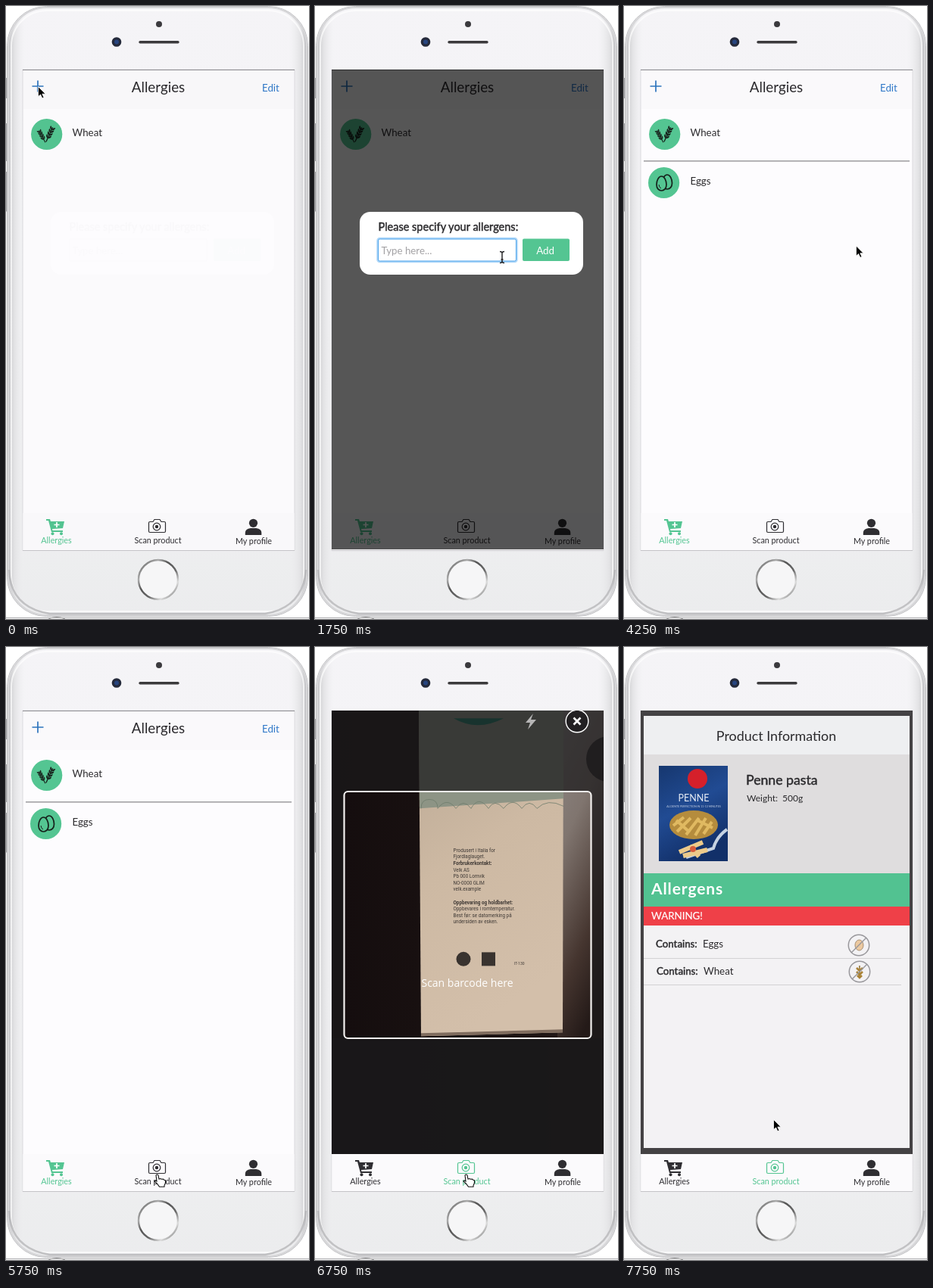
Animation, 400 px wide and 810 px high, one loop 8000 ms. Source, as an HTML page:

```html
<!DOCTYPE html>
<html lang="en">
<head>
<meta charset="utf-8">
<title>Allergy app</title>
<style>
  html, body { margin: 0; width: 100%; height: 100%; overflow: hidden; background: #fff; }
  svg { display: block; width: 400px; height: 810px; font: 13.3px Lato, sans-serif; fill: #2b2a2d; }
  .mid { text-anchor: middle; }
  .heavy { stroke: currentColor; stroke-width: .45; color: #2b2a2d; }
  .line { fill: none; stroke: #1d1d1f; }
  .tab { font-size: 10.8px; text-anchor: middle; color: #2f2e32; fill: currentColor; }
  .on { color: #54c592; }
  .print { font: 6.3px Roboto, sans-serif; fill: #3f3935; }
  .print .b { font-weight: bold; }
</style>
</head>
<body>
<svg viewBox="0 0 400 810">
  <defs>
    <linearGradient id="body" x2="0" y2="1">
      <stop stop-color="#f5f4f7"/><stop offset=".5" stop-color="#f3f3f5"/><stop offset="1" stop-color="#e8e9ea"/>
    </linearGradient>
    <linearGradient id="sides">
      <stop stop-color="#c4c4c7"/><stop offset=".02" stop-color="#e2e2e4"/><stop offset=".055" stop-color="#f4f4f6" stop-opacity=".3"/>
      <stop offset=".94" stop-color="#f4f4f6" stop-opacity=".3"/><stop offset=".98" stop-color="#e2e2e4"/><stop offset="1" stop-color="#bfbfc2"/>
    </linearGradient>
    <linearGradient id="ring" x2="1" y2="1">
      <stop stop-color="#555"/><stop offset=".25" stop-color="#aaa"/><stop offset=".4" stop-color="#555"/>
      <stop offset=".6" stop-color="#666"/><stop offset=".78" stop-color="#ddd"/><stop offset="1" stop-color="#555"/>
    </linearGradient>
    <linearGradient id="table">
      <stop stop-color="#140d0e"/><stop offset=".75" stop-color="#1d1413"/><stop offset="1" stop-color="#2a1f1e"/>
    </linearGradient>
    <linearGradient id="shine" x1=".2" x2=".5" y2="1">
      <stop stop-color="#8d8785"/><stop offset=".35" stop-color="#80756f"/><stop offset=".75" stop-color="#45352f"/><stop offset="1" stop-color="#241a18"/>
    </linearGradient>
    <linearGradient id="carton" x2=".3" y2="1">
      <stop stop-color="#b9a793"/><stop offset=".5" stop-color="#cdb9a3"/><stop offset="1" stop-color="#d3bfaa"/>
    </linearGradient>
    <linearGradient id="pack" x2=".4" y2="1">
      <stop stop-color="#16376f"/><stop offset=".5" stop-color="#214b93"/><stop offset="1" stop-color="#123069"/>
    </linearGradient>
    <clipPath id="screen"><path d="M22 84h359v586H22z"/></clipPath>
    <g id="ear">
      <path d="M0 11V-10" stroke="#17201b" stroke-width="1.3"/>
      <path id="grains" fill="#17201b"/>
    </g>
  </defs>

  <!-- Phone -->
  <path d="M0 95h3v27H0zM0 155h3v50H0zM0 220h3v50H0z" fill="#d4d4d6"/>
  <path d="M.5 95v27M.5 155v50M.5 219v52M0 271h3" class="line" style="stroke:#a5a5a8"/>
  <path d="M0 808.5h400" stroke="#a9a9ac"/>
  <rect x="1.5" y=".5" width="397" height="806" rx="52" fill="url(#body)" stroke="#bebec1"/>
  <rect x="3" y="2" width="394" height="803" rx="51" fill="url(#sides)" stroke="#d6d6d8" stroke-width="2"/>
  <rect x="7" y="6" width="386" height="794" rx="47" fill="none" stroke="#fff" stroke-width="2" opacity=".7"/>
  <path d="M4 745q2 50 54 58h284q50-8 54-58" fill="none" stroke="#b4b4b7" stroke-width="2.5" opacity=".8"/>
  <path d="M56 810q11-5 22 0" class="line" style="stroke:#999"/>
  <circle cx="202" cy="24" r="4" fill="#3b3a3e"/>
  <circle cx="146" cy="47.5" r="6.3" fill="#252a3b"/>
  <circle cx="146" cy="47.5" r="3" fill="#28457f"/>
  <path d="M177 47.7h50" stroke="#3b3a3c" stroke-width="3.4" stroke-linecap="round"/>
  <circle cx="201" cy="758" r="26" fill="#f6f6f7" stroke="url(#ring)" stroke-width="2.4"/>
  <path d="M22 84h359v635.5H22z" fill="#fdfcfe" stroke="#d9d8dc"/>
  <path d="M22 84.5h359" stroke="#8f8e92"/>
  <path d="M22 719.5h359" stroke="#c4c3c7"/>

  <!-- Allergy list -->
  <g id="list">
    <path d="M23 85h357v51H23z" fill="#faf9fb"/>
    <path d="M34.5 106h15M42 98.500v15" stroke="#2c74bd" stroke-width="1.7"/>
    <text class="mid" x="201" y="113.500" font-size="18.8">Allergies</text>
    <text x="338" y="112.500" fill="#2f78c8">Edit</text>
    <circle cx="53.700" cy="169.500" r="20.600" fill="#54c592"/>
    <use href="#ear" transform="translate(47.500 172) rotate(-28) scale(.85)"/>
    <use href="#ear" transform="translate(57.500 169.500) rotate(25)"/>
    <text x="87.500" y="172">Wheat</text>
    <g id="eggs">
      <path d="M26 204.800h351" stroke="#89888b" stroke-width="1.2"/>
      <circle cx="52.600" cy="233.500" r="20.600" fill="#54c592"/>
      <g fill="#54c592" stroke="#16211b" stroke-width="1.7">
        <path id="egg" d="M57 223c4 0 6.500 6 6.500 11s-3 8-6.500 8-6.500-3-6.500-8 2.500-11 6.500-11z"/>
        <use href="#egg" x="-7.500" y="2"/>
      </g>
      <path d="M46 236q.5 4 3 5" class="line"/>
      <text x="87.500" y="236">Eggs</text>
    </g>
  </g>

  <path id="dark" d="M22 84h359v586H22z" fill="#444244"/>

  <!-- Scanner -->
  <g id="scanner" clip-path="url(#screen)">
    <path d="M22 84h359v586H22z" fill="url(#table)"/>
    <path d="M320 84h61v433h-61z" fill="url(#shine)"/>
    <g id="parcel">
      <path d="M137 70h191l-1 429-187 5z" fill="url(#carton)"/>
      <path d="M137 70h191v120l-190 13z" fill="#8d9485"/>
      <path d="M140 203q0-12 11-12t11 12q12-16 24 0 10-14 20 0 10-18 23 0 8-14 20 0 12-16 24 0 10-14 20 0 14-14 35-3" fill="none" stroke="#6f7d6d" stroke-width=".8"/>
      <path d="M183 84q31 18 66 0z" fill="#147b63"/>
      <path d="M140 500l187-5v4l-187 5z" fill="#7f6c5e"/>
      <g id="print" class="print"></g>
      <circle cx="196" cy="402" r="9.500" fill="#39332f"/>
      <path d="M220 393h18v18h-18z" fill="#39332f"/>
      <text x="263" y="410" class="print" style="font-size:5px">IT-130</text>
    </g>
    <path d="M22 84h359v586H22zM43 191h317q4 0 4 4v317q0 4-4 4H43q-4 0-4-4V195q0-4 4-4z" fill="#1b191b" fill-opacity=".73" fill-rule="evenodd"/>
    <path d="M22 517h359v153H22z" fill="#1a1819" opacity=".8"/>
    <circle cx="388" cy="148" r="30" fill="#171617" opacity=".7"/>
    <rect x="38.500" y="191" width="326" height="326" rx="5" fill="none" stroke="#f3f1ef" stroke-width="2.200"/>
    <text class="mid" x="201" y="449" fill="#fff" style="font:14px 'Open Sans',sans-serif">Scan barcode here</text>
    <path d="M288 88l-10 12h6l-3 9 11-13h-7z" fill="#b6b5b5"/>
    <circle cx="346" cy="98" r="14.800" fill="#222022" stroke="#fff" stroke-width="1.400"/>
    <path d="M341.500 93.500l9 9m0-9l-9 9" stroke="#fff" stroke-width="2.600"/>
  </g>

  <!-- Product page -->
  <g id="product">
    <path d="M26 91h351v571H26z" fill="#f3f2f4"/>
    <path d="M26 91h351v51H26z" fill="#eeeff1"/>
    <path d="M26 142h351v157H26z" fill="#dfddde"/>
    <path d="M26 299h351v44H26z" fill="#52c291"/>
    <path d="M26 343h351v25H26z" fill="#ef4048"/>
    <text class="mid" x="201" y="123.500" font-size="17.900">Product Information</text>
    <path d="M46 157h91v126H46z" fill="url(#pack)"/>
    <circle cx="97" cy="174" r="13" fill="#d5202b"/>
    <text class="mid" x="92" y="204" fill="#e8edf5" font-size="12.500">PENNE</text>
    <text class="mid" x="92" y="212" fill="#c5d0e4" font-size="3.600">AL DENTE PERFECTION IN 11-13 MINUTES</text>
    <ellipse cx="92" cy="235" rx="32" ry="19" fill="#b58c3d"/>
    <path d="M65 236l14-11M70 244l18-18M82 248l17-22M94 249l14-23M105 247l11-16M69 229l18 16M97 229l20 10" stroke="#e0b961" stroke-width="4"/>
    <path d="M136 241q-14 10-18 25l-36 12" fill="none" stroke="#c5d2e2" stroke-width="4"/>
    <path d="M73 271l31-13M78 276l32-8M86 263l13 14" stroke="#edca8a" stroke-width="6"/>
    <circle cx="91" cy="267" r="4" fill="#d75b3d"/>
    <text class="heavy" x="161" y="182" font-size="17.700">Penne pasta</text>
    <text x="162" y="204" font-size="12">Weight:</text><text x="209" y="204" font-size="12">500g</text>
    <text x="36" y="327" fill="#fff" font-size="21" font-weight="bold" letter-spacing=".9">Allergens</text>
    <text x="36" y="360" fill="#fff" class="heavy" style="color:#fff;stroke-width:.2">WARNING!</text>
    <text class="heavy" x="42" y="397">Contains:</text><text x="104" y="397">Eggs</text>
    <text class="heavy" x="43" y="432.500">Contains:</text><text x="105" y="432.500">Wheat</text>
    <path d="M26 411.500h340M26 446.500h340" stroke="#d3d2d4"/>
    <ellipse cx="310.500" cy="394" rx="5.500" ry="7" fill="#ecc9a0" stroke="#a58d72"/>
    <path d="M311 438v-17" stroke="#8c6d2f" stroke-width="1.500"/>
    <path d="M307 424l4 4 4-4M307 429l4 4 4-4M308 434l3 3 3-3" fill="none" stroke="#a98235" stroke-width="2.600"/>
    <g fill="none" stroke="#98979b" stroke-width="1.500">
      <circle cx="310" cy="394" r="13.700"/><path d="M300 404l20-20"/>
      <circle cx="311" cy="429" r="13.700"/><path d="M301 439l20-20"/>
    </g>
  </g>

  <!-- Tab bar -->
  <path d="M22.500 670h358v49h-358z" fill="#fbfafc"/>
  <g class="tab" id="tabList">
    <path d="M53 678h5l1 3h18l-2 9-14 1 .5 2H75v2H60l-4-15h-3z"/>
    <circle cx="61.500" cy="697.300" r="2"/><circle cx="73" cy="697.300" r="2"/>
    <path d="M67 682v7M63.500 685.500h7" stroke="#fff" stroke-width="1.700"/>
    <text x="66.500" y="710">Allergies</text>
  </g>
  <g class="tab" id="tabScan">
    <g fill="none" stroke="currentColor" stroke-width="1.200">
      <path d="M190 681.500h4l2-3h7l2 3h4q1.500 0 1.500 1.500v11q0 1.500-1.500 1.500h-19q-1.500 0-1.500-1.500v-11q0-1.500 1.500-1.500z"/>
      <circle cx="199" cy="688" r="4.800"/>
    </g>
    <circle cx="199" cy="688" r="2.200"/>
    <text x="200.500" y="709.500">Scan product</text>
  </g>
  <g class="tab">
    <circle cx="326.500" cy="683.300" r="5.600"/>
    <path d="M315.800 699v-3q0-5 7-6h7.500q7 1 7 6v3z"/>
    <text x="327" y="710.500">My profile</text>
  </g>

  <!-- Dialog -->
  <g id="dialog">
    <path d="M22 84h359v634H22z" opacity=".66" fill="#000"/>
    <rect x="59" y="272" width="295" height="83" rx="14" fill="#fff"/>
    <text class="heavy" x="83.500" y="297" font-size="14.500">Please specify your allergens:</text>
    <rect id="glow" x="82.500" y="307" width="184" height="31" rx="3" fill="none" stroke="#9bcdf7" stroke-width="2.500" opacity=".8"/>
    <rect id="field" x="83.500" y="308" width="182" height="29" rx="2" fill="#fff"/>
    <text id="entry" x="87.500" y="327.500"></text>
    <path id="caret" d="M88.500 315v15" stroke="#222"/>
    <rect id="add" x="274" y="307.500" width="62" height="29.500" rx="2"/>
    <text class="mid" x="304" y="327.500" fill="#fff">Add</text>
  </g>

  <!-- Pointers, each with its hot spot at 0,0 -->
  <g id="pointer">
    <path id="arrow" d="M0 0v13.200l3.100-2.700 2.200 4.800 2.200-.9-2.200-4.700h4.300z" fill="#000" stroke="#fff" stroke-width=".8"/>
    <path id="beam" d="M-3-7.500q3 0 3 2 0-2 3-2M0-5.500v11M-3 7.500q3 0 3-2 0 2 3 2M-1.500 3h3" class="line" stroke-width="1.400"/>
    <path id="hand" d="M-1 1q1.500-2 3 0l1 5 2-.5 1.500.8 2-.3 1.300 1.200 1.500.3q1 4-1.300 7v1.800H3.500Q1 12-3 9q0-2 3 0z" fill="#fff" stroke="#111" stroke-width="1.100"/>
  </g>
</svg>

<script>
const LOOP = 8000, STEP = 250;
const $ = id => document.getElementById(id);
const show = (id, on) => $(id).style.display = on ? "" : "none";
const ramp = (t, from, to) => Math.min(1, Math.max(0, (t - from) / (to - from)));
const ease = p => p * p * (3 - 2 * p);

// Pointer stops: time, x, y
const route = [
  [0, 42.5, 106.5], [750, 42.5, 106.5], [1500, 247, 332], [3250, 247, 332], [3750, 306.5, 317],
  [4500, 306.5, 317], [5500, 199, 697], [7500, 199, 697], [7750, 197.5, 624.5], [LOOP, 197.5, 624.5]
];

let grains = "";
for (let y = -9; y < 7; y += 4)
  for (const side of [-1, 1]) grains += `M0 ${y + 3}q${side * 4}-1 ${side * 3.4}-5q${-side * 3} 1 ${-side * 3.4} 5z`;
$("grains").setAttribute("d", grains);

const label = ["Produsert i Italia for", "Fjordlaglauget.", "*Forbrukerkontakt:", "Velk AS", "Pb 000 Lomvik",
  "NO-0000 GLIM", "velk.example", "", "*Oppbevaring og holdbarhet:", "Oppbevares i romtemperatur.",
  "Best før: se datomerking på", "undersiden av esken."];
$("print").innerHTML = label.map((s, i) =>
  `<text x="182.5" y="${260.5 + i * 8.6}" class="${s[0] === "*" ? "b" : ""}">${s.replace("*", "")}</text>`).join("");

function movePointer(t) {
  const i = route.findIndex(stop => stop[0] > t);
  const [t0, x0, y0] = route[i - 1], [t1, x1, y1] = route[i];
  const p = ease(ramp(t, t0, t1));
  const x = x0 + (x1 - x0) * p, y = y0 + (y1 - y0) * p;
  const open = t > 250 && t < 4000;
  const overField = open && x > 83 && x < 266 && y > 307 && y < 338;
  const overButton = open && x > 273 && x < 336 && y > 307 && y < 338;
  show("beam", overField);
  show("hand", overButton || y > 669);
  show("arrow", !overField && !overButton && y <= 669);
  $("pointer").setAttribute("transform", `translate(${x} ${y})`);
  $("add").setAttribute("fill", overButton ? "#49b886" : "#54c592");
}

function draw(t) {
  const opacity = t < 2000 ? ramp(t, -4, 300) : 1 - ramp(t, 3850, 4150);
  $("dialog").setAttribute("opacity", opacity);

  const focused = t >= 1500;
  const typed = "Eggs".slice(0, Math.max(0, Math.floor((t - 1750) / 250)));
  const entry = $("entry");
  entry.textContent = typed || "Type here...";
  entry.setAttribute("fill", typed ? "#444" : "#a2a1a4");
  $("field").setAttribute("stroke", focused ? "#4ba3ec" : "#b3b2b5");
  show("glow", focused);
  show("caret", focused && Math.floor(t / 500) % 2 === 0);
  const width = typed ? entry.getComputedTextLength() : 0;
  $("caret").setAttribute("transform", `translate(${width} 0)`);

  show("eggs", t >= 4000);
  show("list", t < 6000);
  show("dark", t >= 6000);
  show("scanner", t >= 6500 && t < 7500);
  show("product", t >= 7750);
  $("parcel").setAttribute("transform", `translate(0 ${14 * (1 - ease(ramp(t, 6500, 7250)))})`);
  $("tabList").classList.toggle("on", t < 6500);
  $("tabScan").classList.toggle("on", t >= 6500);
  movePointer(t);
}

function tick() {
  const t = performance.now() % LOOP;
  draw(Math.floor(t / STEP) * STEP);
  requestAnimationFrame(tick);
}
tick();
</script>
</body>
</html>
```
